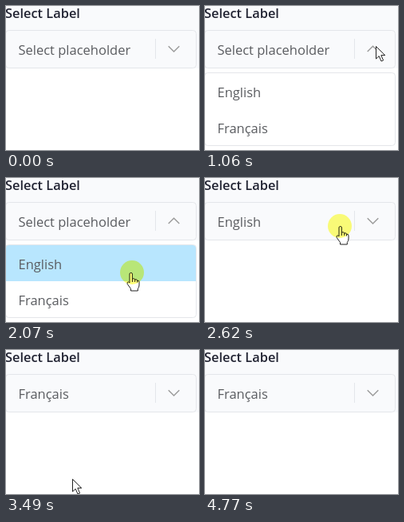
Animation, 242 px wide and 180 px high, one loop 5040 ms. Source, as an HTML page:

```html
<!DOCTYPE html>
<html lang="en">
<head>
<meta charset="utf-8">
<title>Select</title>
<style>
  html, body { margin: 0; height: 100%; overflow: hidden; background: #fff; }
  svg { display: block; width: 100vw; height: 100vh; }
  text { font: 16.5px "Open Sans", "Noto Sans", sans-serif; fill: #5a5c60; }
  .label { font-size: 16.4px; font-weight: 600; fill: #222433; }
  .selected { fill: #1c1d20; }
  .line { fill: none; stroke: #e4e6ea; }
  .pointer { fill: #fff; stroke: #222; stroke-linejoin: round; }
  #click { fill: #ffff78; mix-blend-mode: multiply; }
</style>
</head>
<body>
<svg viewBox="0 0 242 180">
  <rect width="242" height="78" fill="#f9fafc"/>
  <text class="label" x="-1" y="14.5">Select Label</text>
  <rect class="line" x="-.5" y="30.5" width="239" height="47" rx="4"/>
  <path class="line" d="M187.5 41V66"/>
  <path id="chevron" fill="none" stroke="#9c9c9c" stroke-width="1.5"/>
  <text id="value" x="15.5" y="61"></text>

  <g id="menu">
    <rect x="-.5" y="83.5" width="239" height="91" rx="4" fill="#fff"/>
    <path id="hover" fill="#b8e6fe"/>
    <rect class="line" x="-.5" y="83.5" width="239" height="91" rx="4"/>
    <text class="option" x="15.5" y="114">English</text>
    <text class="option" x="15.5" y="159">Français</text>
  </g>

  <g id="cursor">
    <path id="arrow" class="pointer" d="M.5 .5V16L4.2 12.6 7 19 9.6 17.9 6.8 11.6H11.8Z"/>
    <g id="hand" class="pointer">
      <path d="M-3 13V2Q-3 .5 -1.3 .5Q.4 .5 .4 2V8Q3.4 7 3.7 9Q6.2 8 6.5 10.2Q9 9.8 9 12V16Q8.8 19 7.3 20.5V23H-1.5V20.5L-5.8 14.5Q-6.5 11.8 -4.6 11.8Z"/>
      <path d="M.4 8V12M3.7 9V12M6.5 10.2V12.5"/>
    </g>
  </g>
  <circle id="click" r="15"/>
</svg>
<script>
const LOOP = 5040;
const HOME = { x: 206, y: 140 };
const VISIBLE = [270, 4770];

// Each move runs from the previous resting point in evenly timed steps.
const moves = [
  { start: 270, end: 400, steps: 3, x: 175, y: 42 },
  { start: 600, end: 800, steps: 4, x: 214, y: 50 },
  { start: 1530, end: 1730, steps: 4, x: 164, y: 110 },
  { start: 1800, end: 1930, steps: 2, x: 158, y: 118 },
  { start: 2270, end: 2340, steps: 2, x: 165, y: 95 },
  { start: 2480, end: 2550, steps: 2, x: 171, y: 60 },
  { start: 2830, end: 3030, steps: 4, x: 102, y: 150 },
  { start: 3100, end: 3160, steps: 2, x: 83, y: 161 },
  { start: 3690, end: 4160, steps: 8, x: 159, y: 62 },
  { start: 4230, end: 4300, steps: 2, x: 169, y: 56 },
  { start: 4500, end: 4770, steps: 5, x: 199, y: 183 },
];

// Every click toggles the menu when it ends.
const clicks = [
  { start: 1000, end: 1060, x: 214, y: 50 },
  { start: 2070, end: 2200, x: 158, y: 118, value: "English" },
  { start: 2620, end: 2680, x: 169, y: 60 },
  { start: 3360, end: 3490, x: 83, y: 161, value: "Français" },
];

const $ = id => document.getElementById(id);
const options = [...document.querySelectorAll(".option")];
const within = (v, lo, hi) => v >= lo && v < hi;
const ease = p => p * p * (3 - 2 * p);
const show = (id, on) => $(id).setAttribute("display", on ? "inline" : "none");

function pointerAt(t) {
  let from = HOME;
  for (const move of moves) {
    if (t < move.start) break;
    const interval = (move.end - move.start) / (move.steps - 1);
    const step = Math.floor((t - move.start) / interval + 1e-6) + 1;
    const p = ease(Math.min(step / move.steps, 1));
    from = { x: from.x + (move.x - from.x) * p, y: from.y + (move.y - from.y) * p };
  }
  return from;
}

function draw(t) {
  const pointer = pointerAt(t);
  const visible = within(t, ...VISIBLE);
  const done = clicks.filter(c => t >= c.end);
  const open = done.length % 2 === 1;
  const chosen = done.filter(c => c.value).pop()?.value;

  $("value").textContent = chosen || "Select placeholder";
  $("chevron").setAttribute("d", open ? "M203.7 57L210.5 50.3L217.3 57" : "M203.7 50.3L210.5 57L217.3 50.3");

  show("menu", open);
  options.forEach(o => o.classList.toggle("selected", o.textContent === chosen));
  const row = open && within(pointer.y, 84, 174) ? (pointer.y < 129 ? 0 : 1) : -1;
  show("hover", row >= 0);
  $("hover").setAttribute("d", row === 0
    ? "M0 129V84H235Q238 84 238 87V129Z"
    : "M0 129H238V171Q238 174 235 174H0Z");

  const click = clicks.find(c => within(t, c.start, c.end));
  show("click", click);
  if (click) $("click").setAttribute("transform", `translate(${click.x} ${click.y})`);

  const overTarget = open ? row >= 0 : within(pointer.y, 30, 78);
  show("cursor", visible);
  show("hand", overTarget);
  show("arrow", !overTarget);
  $("cursor").setAttribute("transform", `translate(${Math.round(pointer.x)} ${Math.round(pointer.y)})`);
}

const startTime = performance.now();
function tick() {
  draw((performance.now() - startTime) % LOOP);
  requestAnimationFrame(tick);
}
tick();
</script>
</body>
</html>
```
